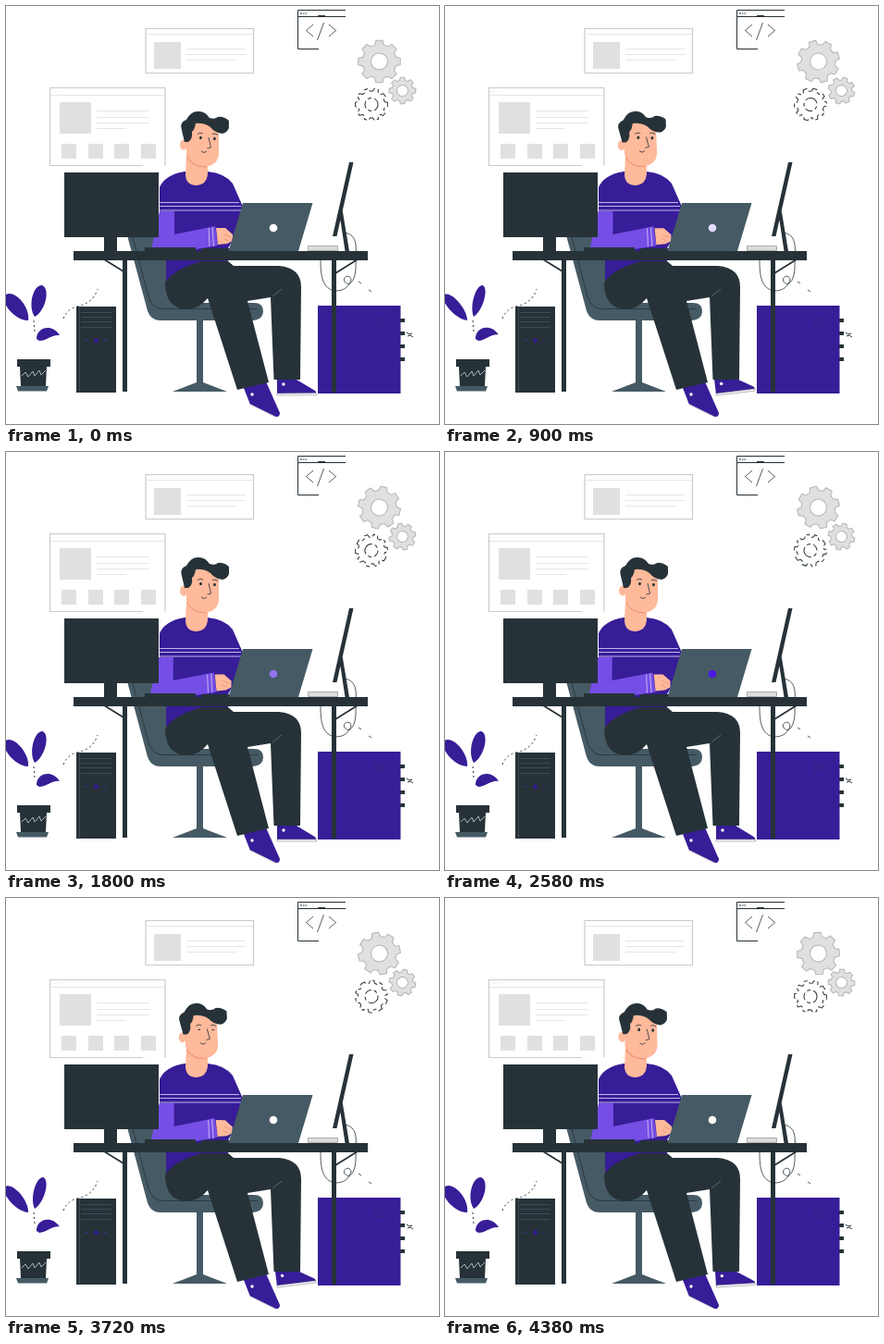
An HTML page that plays this animation: 468 px wide and 452 px high, repeating every 4.41 s.

```html
<!DOCTYPE html>
<html lang="en">
<head>
<meta charset="utf-8">
<title>At the desk</title>
<style>
html, body { margin: 0; width: 100%; height: 100%; overflow: hidden; background: #fff; }
svg { display: block; width: 468px; height: 452px; }
.ink { fill: #263238; }
.slate { fill: #455a64; }
.violet { fill: #371d97; }
.skin { fill: #ffb99b; }
.pale { fill: #e0e0e0; }
.line { fill: none; stroke: #263238; }
.frame { fill: none; stroke: #cacaca; stroke-width: 1.2; }
.thin { fill: none; stroke: #e6e6e6; }
.gear { fill: #e0e0e0; stroke: #b4b4b4; }
.stripe { fill: none; stroke: #c3b4f2; }
</style>
</head>
<body>
<svg viewBox="0 0 468 452" xmlns="http://www.w3.org/2000/svg">
  <!-- windows -->
  <path class="frame" d="M151 24.500H267.500V72.500H151Z"/>
  <path class="thin" d="M151 30.500H267M195 46.500H259M195 52.500H259M195 58.500H249"/>
  <path class="pale" d="M160 39h29v29h-29z"/>
  <path class="frame" d="M148 172.500H47.500V88.500H172V172.500"/>
  <path class="thin" d="M48 96.500H172M98 113.500H155M98 120.500H155M98 126.500H155M98 132.500H130M51 92.500h1.500m2 0h1.500m2 0h1.500"/>
  <path class="pale" d="M58 104h34v34h-34zM60 149h16v16h-16zM89 149h16v16h-16zM117 149h16v16h-16zM146 149h16v16h-16z"/>
  <path class="line" d="M367 11.500H315.500M367 4.500H315.500V46.500H338M318 8h2m1 0h1.500m1 0h1.500M337 10.500h8"/>
  <path class="line" stroke-width=".8" d="M332 20L324.500 26.500L332 33M343.500 18L336.500 37M349 20L356.500 26.500L349 33"/>

  <!-- gears -->
  <path id="gearA" class="gear" fill-rule="evenodd"/>
  <path id="gearB" class="gear" fill-rule="evenodd"/>
  <path id="gearC" class="line" stroke-dasharray="8 3 4 3"/>

  <!-- chair -->
  <path class="slate" d="M131 248L152 326Q155 340 167 340H267Q278 339 278 330Q278 321 268 321H185L172 248Z"/>
  <path class="line" stroke-width=".8" d="M137 250L154 314Q158 327 169 327.500H272"/>
  <path class="slate" d="M206 339H213V407L239 417H180L206 407Z"/>

  <!-- cabinet -->
  <path class="violet" d="M337 324h89.500v95h-89.500z"/>
  <path class="ink" d="M426 338h5v4h-5zM426 352h5v4h-5zM426 366h5v4h-5zM426 380h5v4h-5z"/>
  <path class="line" stroke-dasharray="2 2" opacity=".5" d="M398 338h14M399 341.500h12M399 345h12"/>
  <path class="line" d="M433 353l3 2l3-1M434 357l3-1l3 2"/>

  <!-- body -->
  <path class="violet" d="M193 179C179 181 170 187 166 196V222H173V302L240 290L240 262L260 226L245 192Q237 181 218 179Z"/>
  <path class="stripe" d="M166 212.500H252M166 216.500H254M166 221H256"/>

  <!-- shoes -->
  <g id="foot">
    <path class="violet" d="M293 401L309 401L332 415Q336 417 335 419H293Z"/>
    <path d="M293 419H335.500V421H293Z" fill="#fff" stroke="#8f8f98" stroke-width=".6"/>
    <circle cx="300" cy="409" r="1.700" fill="#fff"/>
  </g>
  <path class="violet" d="M255 408L280 404L296 440Q296 445 291 444L264 431Z"/>
  <path d="M264 431L291 444.500" stroke="#ddd" stroke-width="1.300"/>
  <circle cx="266" cy="420" r="1.700" fill="#fff"/>

  <path class="ink" d="M172 299Q182 284 212 276H240L246 281H295Q319 283 319 304L318 404H289.500L286 315L261 319L284 407L250 415L218 316Q208 328 195 328Q172 327 172 299Z"/>
  <path d="M288 314L298 306" stroke="#596970"/>

  <!-- head -->
  <path class="skin" d="M195 160L194 183Q195 194 206 194Q217 193 218 182V166Z"/>
  <g id="head">
    <ellipse class="skin" cx="192" cy="150" rx="4" ry="5.500"/>
    <path class="skin" d="M195 128V160Q198 174 213 174Q229 173 230 160V133Q221 122 205 124Z"/>
    <path d="M196 163Q201 174 217 174" fill="none" stroke="#e8906f"/>
    <path class="ink" d="M193 147L190 134Q187 126 195 123Q200 114 207 114Q215 113 220 121Q226 123 229 120Q235 119 241 124V132Q239 137 234 138Q226 137 221 131Q214 126 205 127Q204 134 201 136Q202 144 197 147Z"/>
    <path class="line" stroke-width=".8" d="M207 138.500Q210 136 213 138M223 138.500Q226 137 229 139.500M219 142L221.500 153L217.500 154M211 157Q214 160 217 157"/>
    <ellipse class="ink eye" cx="210.500" cy="142.500" rx="1.400"/>
    <ellipse class="ink eye" cx="225.500" cy="143.500" rx="1.400"/>
  </g>

  <!-- desk and things around it -->
  <path class="ink" d="M73 265H391V275H357V418H352V275H131V417H126V275H73Z"/>
  <path class="line" stroke-width="1.800" d="M106 274L127 287M380 274L356 289"/>
  <path class="ink" d="M371 169H375.500L357.500 249H353ZM360 222L363.500 220L371 265H366.500Z"/>
  <path d="M326.500 259.500H358.500V264.500H326.500Z" fill="#ddd" stroke="#aaa"/>
  <path class="line" stroke-width=".8" d="M365 245C382 247 378 263 378 284C377 299 370 304 366 298C363 293 372 289 373 296C371 303 366 308 356 308C342 306 340 292 340 275M381 298l3 2M392 307l3 2"/>

  <g id="arm">
    <path d="M157 263L166 222H182V247L226 238L229 259L205 263Z" fill="#754ee5"/>
    <path class="stripe" d="M219 240L220 260M223 239L224.500 260"/>
    <path class="skin" d="M227 240H237L245 247V254L239 257L229 258Z"/>
    <path d="M236 247L243 250M235 251L240 254" fill="none" stroke="#e99274" stroke-width=".8"/>
  </g>

  <path class="ink" d="M63 180H165V250H120V265H106V250H63ZM150 261H205V265H150ZM211 262H243V265H211Z"/>
  <path class="slate" d="M256 213H331.500L316 265H240.500Z"/>
  <circle id="lamp" cx="289" cy="240" r="4.300"/>

  <path class="ink" d="M76 325H119V418H76Z"/>
  <path d="M81 331.500H114M81 336.500H114M81 341.500H114M81 347.500H114M79.500 326V417" fill="none" stroke="#45545b" stroke-width=".8"/>
  <path d="M85 361.500H89M105 361.500H109" stroke="#3c3480"/>
  <circle class="violet" cx="97.500" cy="362" r="2.400"/>
  <path class="line" stroke-dasharray="2 3" d="M62 338Q66 328 76 325Q94 322 99 306"/>

  <!-- plant -->
  <path class="ink" d="M12 382H48V390H44L43 411H16L15 390H12Z"/>
  <path class="slate" d="M11 411H46L44 416.500H13Z"/>
  <path d="M17 400l4-4l3 5l5-6l2 5l5-6l2 5l5-5" fill="none" stroke="#cfd8dc" stroke-width=".8"/>
  <path class="line" stroke-dasharray="2 3" d="M30 340L31 352"/>
  <path id="leafA" class="violet"/>
  <path id="leafB" class="violet"/>
  <path id="leafC" class="violet" d="M33 360C33 347 50 343 58 356C49 355 44 362 36 362Z"/>
</svg>
<script>
const LOOP = 4410;
const TAU = 2 * Math.PI;
const $ = id => document.getElementById(id);
const eyes = document.querySelectorAll('.eye');
const clamp = x => Math.max(0, Math.min(1, x));
const wave = (t, period) => (1 - Math.cos(TAU * t / period)) / 2;
const move = (id, value) => $(id).setAttribute('transform', value);

// Share of each motion, 0 to 1, at time t.
const lift = t => Math.sqrt(clamp(Math.sin(TAU * t / 3000)));
const glow = t => clamp(Math.min((t - 600) / 1980, (3700 - t) / 1100));
const blink = t => Math.exp(-(((t % 3180 - 540) / 90) ** 2));

function gearPath(teeth, tip, root, hole) {
  const pts = [];
  for (let i = 0; i < teeth; i++) {
    for (const [f, r] of [[-.33, root], [-.2, tip], [.2, tip], [.33, root]]) {
      const a = (i + f) * TAU / teeth;
      pts.push(`${r * Math.cos(a)} ${r * Math.sin(a)}`);
    }
  }
  const arc = `A${hole} ${hole} 0 1 0`;
  return `M${pts.join('L')}ZM${hole} 0${arc} ${-hole} 0${arc} ${hole} 0Z`;
}

// Two bulging sides between the root and the tip.
function leafPath(x0, y0, x1, y1, width) {
  const dx = x1 - x0, dy = y1 - y0, w = width / Math.hypot(dx, dy);
  const p = (k, side) => `${x0 + dx * k - dy * w * side} ${y0 + dy * k + dx * w * side}`;
  return `M${x0} ${y0}C${p(.25, 1)} ${p(.95, 1)} ${x1} ${y1}C${p(.95, -1)} ${p(.25, -1)} ${x0} ${y0}Z`;
}

const gears = [
  { id: 'gearA', x: 403.5, y: 60, dir: 1, d: gearPath(8, 23, 18.5, 9) },
  { id: 'gearB', x: 428.5, y: 91.5, dir: -1, d: gearPath(8, 14.5, 11.5, 6) },
  { id: 'gearC', x: 395, y: 106.5, dir: -1, d: gearPath(10, 17.5, 14.5, 7) },
];
for (const g of gears) $(g.id).setAttribute('d', g.d);

function draw(t) {
  for (const g of gears) {
    move(g.id, `translate(${g.x} ${g.y}) rotate(${g.dir * 360 * t / LOOP})`);
  }
  const up = lift(t), sway = wave(t, LOOP / 2), reach = wave(t, LOOP), light = glow(t);
  move('head', `rotate(${-2.5 * up} 206 180)`);
  move('foot', `rotate(${-7 * up} 294 420)`);
  move('arm', `translate(${-1.5 * reach} 0) rotate(${.5 * reach} 170 245)`);

  const width = 11 * (1 - .25 * sway);
  $('leafA').setAttribute('d', leafPath(24, 340, -sway, 312, width));
  $('leafB').setAttribute('d', leafPath(31, 336, 39 + 2 * sway, 302, width * .9));
  move('leafC', `rotate(${-2 * sway} 33 362)`);

  eyes.forEach(e => e.setAttribute('ry', 1.8 - 1.2 * blink(t)));
  const [r, g, b] = [75, 24, 222].map(v => 255 + (v - 255) * light);
  $('lamp').setAttribute('fill', `rgb(${r},${g},${b})`);
}

const start = performance.now();
function tick() {
  draw((performance.now() - start) % LOOP);
  requestAnimationFrame(tick);
}
tick();
</script>
</body>
</html>
```
